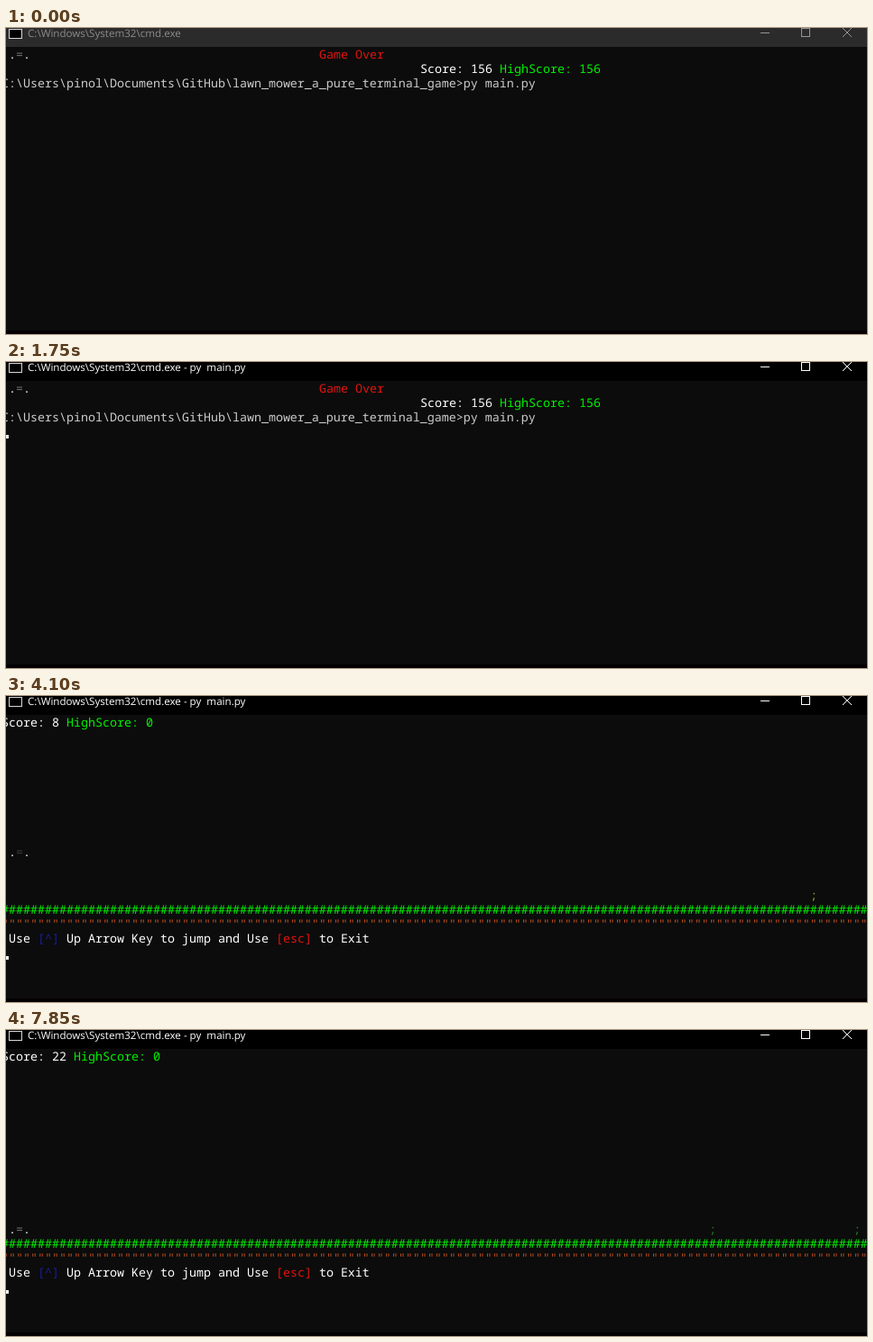
Write an HTML page that moves like this. It is 954x340 px and loops after 8000 ms.

```html
<!DOCTYPE html>
<html lang="en">
<head>
<meta charset="utf-8">
<title>Terminal game</title>
<style>
  html, body { margin: 0; width: 100%; height: 100%; overflow: hidden; background: #0c0c0c; }
  svg { display: block; width: 954px; height: 340px; }
  text { white-space: pre; text-rendering: geometricPrecision; }
  .term text { font: 13.333px "Noto Sans Mono", "DejaVu Sans Mono", monospace; fill: #fff; }
  #title { font: 11.6px "Open Sans", "Noto Sans", sans-serif; }
  .lime { fill: #00f000; }
  .red { fill: #e0140f; }
</style>
</head>
<body>
<svg viewBox="0 0 954 340">
  <rect width="954" height="340" fill="#0c0c0c"/>
  <rect y="336" width="954" height="4" fill="#050002"/>
  <rect id="bar" width="954" height="21"/>
  <rect x="3.5" y="1.5" width="14" height="10" fill="#000" stroke="#d8d8d8"/>
  <text id="title" x="24" y="10"></text>
  <g id="buttons" fill="none">
    <path d="M836 5.5h10M881.5 .5h9v9h-9z" shape-rendering="crispEdges"/>
    <path d="M927 0l10 10M937 0l-10 10"/>
  </g>
  <g id="shell" class="term">
    <text data-at="44,0" class="red" style="fill:#e0140f">Game Over</text>
    <text data-at="58,1">Score: 156 <tspan class="lime">HighScore: 156</tspan></text>
    <text data-at="0,2" style="fill:#ccc">C:\Users\pinol\Documents\GitHub\lawn_mower_a_pure_terminal_game&gt;py main.py</text>
  </g>
  <g id="game" class="term">
    <text data-at="0,0">Score: <tspan id="score"></tspan> <tspan class="lime">HighScore: 0</tspan></text>
    <text id="weed1">;</text>
    <text id="weed2">;</text>
    <text id="grass" data-at="0,13" style="fill:#00f000"></text>
    <text id="soil" data-at="0,14" style="fill:#bd501c"></text>
    <text data-at="1,15">Use <tspan fill="#1a1f94">[^]</tspan> Up Arrow Key to jump and Use <tspan class="red">[esc]</tspan> to Exit</text>
  </g>
  <g id="mower" class="term"><text>.<tspan id="blade">=</tspan>.</text></g>
  <rect id="caret" x="-5" width="8" height="4" fill="#f2f2f2"/>
  <g id="pointer">
    <circle cx="-1" cy="-1" r="12" fill="#ff0" fill-opacity=".5"/>
    <path d="M0 0v15l3.500-3.300 2.300 5.300 2.500-1.100-2.300-5.200h4.700z" fill="#fff"/>
  </g>
</svg>
<script>
const LOOP = 8000, COLS = 120, GROUND = 12;
const ACTIVE = 650, LAUNCH = 1550, CARET = 1600, CLEAR = 1850, START = 1950;
// times at which the score goes up by one
const TICKS = [2200, 2500, 2750, 3000, 3300, 3550, 3800, 4100, 4350, 4650, 4900,
  5150, 5400, 5700, 5950, 6250, 6500, 6800, 7050, 7300, 7600, 7850];

const $ = id => document.getElementById(id);
const show = (el, on) => el.setAttribute("display", on ? "inline" : "none");
const mix = (a, b, k) => a + (b - a) * k;

function place(el, col, row) {
  el.setAttribute("x", 8 * col - 5);
  el.setAttribute("y", 34 + 16 * row);
}

function weedColor(score) {
  if (score < 8) return "#5c5c50";
  if (score < 14) return "#8a9a28";
  return score < 19 ? "#3fae1e" : "#1f7a1f";
}

function drawWeed(el, col, color) {
  show(el, col < COLS);
  place(el, col, GROUND);
  el.style.fill = color;
}

function drawPointer(t) {
  const on = t >= 250 && t < 1150;
  show($("pointer"), on);
  if (!on) return;
  const s = Math.floor((t - 250) / 50) * 50 + 250;
  let x = 660, y = 12;
  if (s < 600) {
    const k = 1 - (1 - (s - 250) / 350) ** 2;
    x = mix(770, 660, k);
    y = mix(332, 12, k);
  } else if (s > 800) {
    const k = ((s - 800) / 350) ** 2;
    x = mix(660, 720, k);
    y = mix(12, 345, k);
  }
  $("pointer").setAttribute("transform", `translate(${x} ${y})`);
}

function drawWindow(t) {
  const active = t >= ACTIVE;
  $("bar").setAttribute("fill", active ? "#000" : "#2b2b2b");
  $("title").setAttribute("fill", active ? "#fff" : "#8c8c8c");
  $("buttons").setAttribute("stroke", active ? "#fff" : "#969696");
  $("title").textContent = "C:\\Windows\\System32\\cmd.exe" + (t >= LAUNCH ? " - py  main.py" : "");
}

function draw(t) {
  drawWindow(t);
  drawPointer(t);

  const playing = t >= START;
  const score = TICKS.filter(at => at <= t).length;
  const jump = playing ? Math.max(0, 4 - Math.abs(score - 9)) : 0;
  show($("shell"), t < CLEAR);
  show($("game"), playing);
  show($("mower"), t < CLEAR || playing);
  place($("mower").firstChild, 1, playing ? GROUND - jump : 0);
  $("blade").style.fill = jump ? "#3c3c3c" : "#707070";

  $("score").textContent = score;
  drawWeed($("weed1"), COLS - score, weedColor(score));
  drawWeed($("weed2"), COLS + 20 - score, weedColor(score));

  show($("caret"), t >= CARET);
  const row = playing ? 16 : t < CLEAR ? 3 : 0;
  $("caret").setAttribute("y", 33 + 16 * row);
}

$("grass").textContent = "#".repeat(COLS);
$("soil").textContent = '"'.repeat(COLS);
for (const el of document.querySelectorAll("[data-at]")) place(el, ...el.dataset.at.split(","));

const begin = performance.now();
function frame() {
  draw((performance.now() - begin) % LOOP);
  requestAnimationFrame(frame);
}
frame();
</script>
</body>
</html>
```
